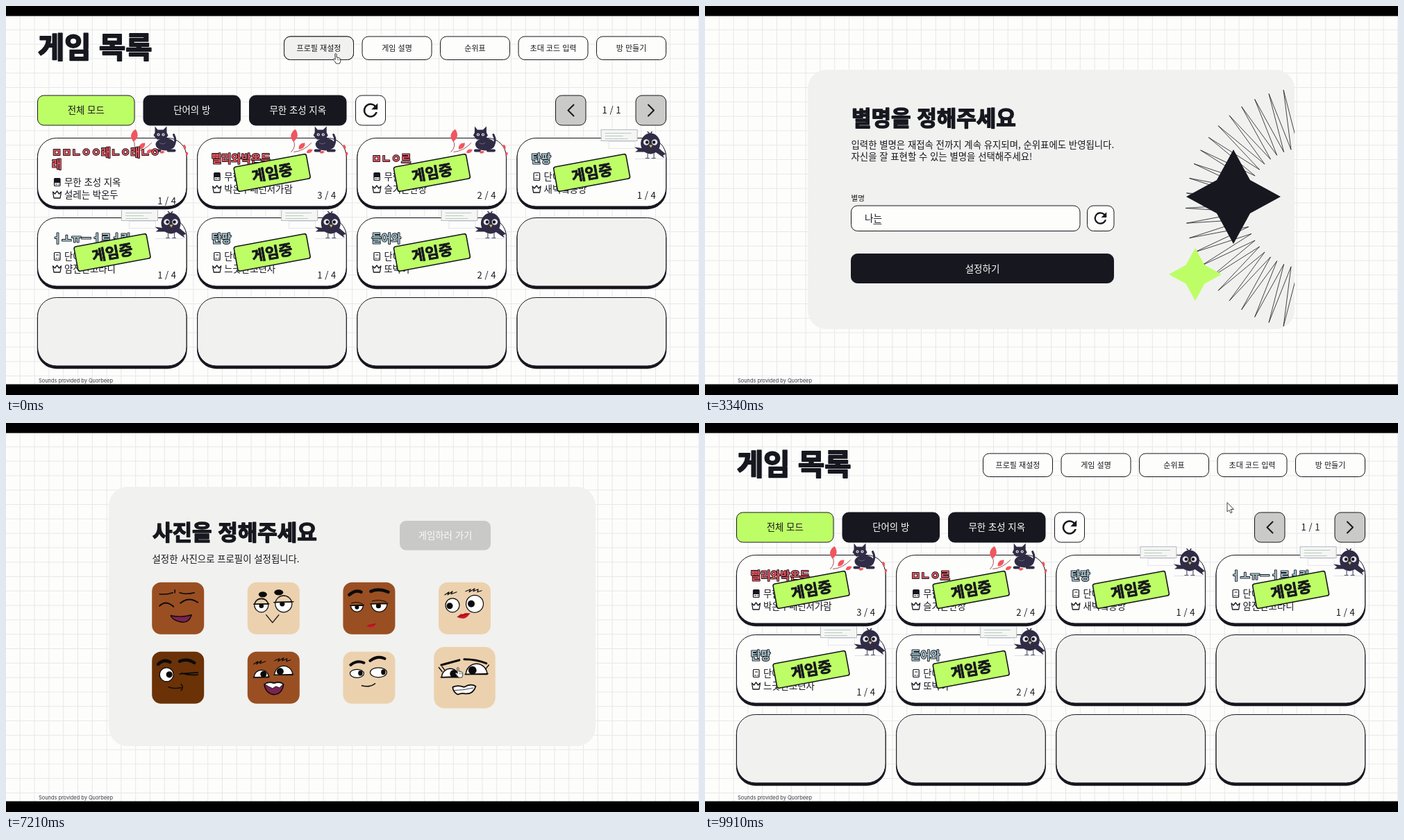
Write an HTML page that moves like this. It is 998x561 px and loops after 9970 ms.

```html
<!DOCTYPE html>
<html lang="ko">
<head>
<meta charset="utf-8">
<style>
html, body { margin: 0; width: 100%; height: 100%; overflow: hidden; background: #000; }
svg { display: block; width: 998px; height: 561px; }
text { font-family: "Noto Sans CJK KR", "Noto Sans CJK", "Noto Sans CJK JP", sans-serif; white-space: pre; }
.fun { font-weight: 900; stroke-linejoin: round; paint-order: stroke; }
.latin { font-family: Inter, sans-serif; }
</style>
</head>
<body>
<svg id="stage" viewBox="0 0 998 561" xmlns="http://www.w3.org/2000/svg"></svg>
<script>
const LOOP = 9970, INK = '#17171f', GREEN = '#bdfe66', PAPER = '#fdfdfc', MIST = '#f1f1ef';
const BROWN = '#9a4f22', SKIN = '#ecd1ae', DARK = '#6a3206';

// ---------- drawing helpers ----------
const at = (x, y, body, more = '') => `<g transform="translate(${x} ${y})${more}">${body}</g>`;
const rect = (x, y, w, h, r, fill, stroke = 'none', sw = 1, more = '') =>
  `<rect x="${x}" y="${y}" width="${w}" height="${h}" rx="${r}" fill="${fill}" stroke="${stroke}" stroke-width="${sw}" ${more}/>`;
const path = (d, fill = 'none', stroke = 'none', sw = 1) =>
  `<path d="${d}" fill="${fill}" stroke="${stroke}" stroke-width="${sw}" stroke-linecap="round" stroke-linejoin="round"/>`;
const oval = (x, y, rx, ry = rx, fill = '#fff', stroke = 'none', sw = 1.2) =>
  `<ellipse cx="${x}" cy="${y}" rx="${rx}" ry="${ry}" fill="${fill}" stroke="${stroke}" stroke-width="${sw}"/>`;
const text = (x, cy, size, s, fill = INK, more = '') =>
  `<text x="${x}" y="${(cy + size * .37).toFixed(2)}" font-size="${size}" fill="${fill}" ${more}>${s}</text>`;
const MID = 'text-anchor="middle"';
const title = (x, cy, size, s) =>
  text(x, cy, size, s, INK, `class="fun" stroke="${INK}" stroke-width="${size * .045}"`);
const button = (x, y, w, h, fill, s, size, color = INK) =>
  rect(x, y, w, h, 9, fill, INK) + text(x + w / 2, y + h / 2, size, s, color, MID);
const reload = (x, y, k) =>
  at(x, y, path('M5.65 -5.65A8 8 0 1 0 7.73 2H5.65A6 6 0 1 1 0 -6C1.66 -6 3.14 -5.31 4.22 -4.22L1 -1H8V-8Z', INK), ` scale(${k})`);

const defs = `<defs>
  <pattern id="grid" x="0" y="14" width="20.8" height="20.8" patternUnits="userSpaceOnUse">
    <rect width="21" height="21" fill="#fdfdfc"/><path d="M20.3 0V21M0 20.3H21" stroke="#e8e8ea"/></pattern>
  <clipPath id="clip"><rect x="148" y="92" width="701" height="374" rx="27"/></clipPath>
</defs>`;

// ---------- room list ----------
const NIGHT = '#302c46', RED = '#f0565e';
const leaf = (x, y, a, k = 1) => at(x, y, path('M0 0C-7 -5 -6 -13 0 -18C6 -12 6 -5 0 0Z', RED), ` rotate(${a}) scale(${k})`);
const cat = path('M135 20Q143 12 138 3M139 20Q153 19 164 7', 'none', '#a0525e') +
  leaf(138, 5, 10) + leaf(146, 16, 45, .7) + leaf(157, 21, 65, .55) + leaf(176, 21, 80, .4) + leaf(213, 16, -20, .4) + leaf(214, 26, 20, .35) +
  path('M195 12Q201 4 196 -5', 'none', NIGHT, 3) +
  path('M169 -17L173 -12H181L186 -17V-8L188 -4L184 2H172L167 -4L169 -8Z', NIGHT) + oval(184, 9, 14, 9, NIGHT) +
  oval(174, -5, 2) + oval(181, -5, 2) + oval(174, -5, .9, .9, '#111') + oval(181, -5, .9, .9, '#111') +
  path('M170 18H176M188 18H197', 'none', NIGHT, 4) + path('M176 7Q180 10 184 7', 'none', '#77738c', .8);
const bird = rect(121, -12, 52, 16, 0, '#f5f6f3', '#b5b8c4') + path('M127 -7H164M127 -3H152M127 1H159', 'none', '#a9c0b8', .8) +
  rect(132, 5, 38, 10, 0, 'none', '#e4e4ee') + path('M170 30H211', 'none', '#d9d9e4', .8) +
  path('M183 15L169 13L174 17L170 20L185 20M201 12L214 23L210 25L212 29L199 20', NIGHT) +
  path('M191 -6L188 -9M192 -6L194 -9', 'none', NIGHT, 1.5) + oval(192, 8, 14, 15, NIGHT) +
  path('M188 22V29M197 22V29M185 29H190M194 29H199', 'none', '#56546a', 1.2) +
  oval(186, 6, 4.2, 4.2, '#e9e9f0') + oval(198, 6, 4.2, 4.2, '#e9e9f0') + oval(187, 6, 2.2, 2.2, '#111') + oval(197, 6, 2.2, 2.2, '#111') +
  path('M190 10H195L192.5 14Z', '#d9b96a');
const badge = at(107.5, 50, rect(-53, -18, 106, 36, 3, GREEN, INK, 1.6) +
  text(0, 0, 21.5, '게임중', INK, `${MID} class="fun" stroke="${INK}" stroke-width=".8"`), ' rotate(-10.5)');
const crown = path('M-6 -4L-3 -1L0 -5L3 -1L6 -4L4.5 5H-4.5Z', 'none', INK, 1.3);
const door = hard => rect(-4, -5.5, 8.5, 11, 1, 'none', INK, 1.2) +
  (hard ? rect(-4, -5, 8.5, 6, 0, INK) : path('M-1 -2H2', 'none', INK, 1.2)) + path('M-2 3H0M2 3H3', 'none', INK, 1.2);

const rooms = [
  { hard: 1, name: ['ㅁㅁㄴㅇㅇ래ㄴㅇ래ㄴㅇ', '래'], host: '설레는 박온두', n: 1, open: 1 },
  { hard: 1, name: ['빨리와박온두'], host: '박온두패턴서가람', n: 3 },
  { hard: 1, name: ['ㅁㄴㅇ르'], host: '슬기론단장', n: 2 },
  { name: ['탄팡'], host: '새벽녘공방', n: 1 },
  { name: ['ㅓㅗㅠㅡㅓ르ㅓ림'], host: '얌전한고라니', n: 1 },
  { name: ['탄팡'], host: '느긋한조련사', n: 1 },
  { name: ['들어와'], host: '또박이', n: 2 }
];

function card(room, i) {
  const x = 45.5 + (i % 4) * 230.2, y = 190.5 + Math.floor(i / 4) * 115;
  const base = rect(x, y + 2, 214.5, 100, 27, INK, INK, 1.4) + rect(x, y, 214.5, 98.5, 27, room ? PAPER : MIST, INK);
  if (!room) return base;
  const two = room.name.length > 1, dy = two ? 8 : 0;
  const names = room.name.map((s, k) => text(20.5, (two ? 21 : 30) + k * 17, 15.4, s, room.hard ? RED : '#a9c9d1',
    `class="fun" stroke="${INK}" stroke-width="1.8"`)).join('');
  return base + at(x, y, (room.hard ? cat : bird) + names +
    at(28, 55.5 + dy, door(room.hard)) + text(38.5, 55.5 + dy, 13.4, room.hard ? '무한 초성 지옥' : '단어의 방') +
    at(28, 73.5 + dy, crown) + text(38.5, 73.5 + dy, 13.4, room.host) +
    text(199.5, 82.5 + dy, 13, room.n + ' / 4', INK, 'text-anchor="end"') + (room.open ? '' : badge));
}
const cards = set => Array.from({ length: 12 }, (_, i) => card(set[i], i)).join('');
const chevron = (x, k) => rect(x, 129, 43.5, 43, 9, '#cacac8', INK) +
  path(`M${x + 22 + 4 * k} 142.5L${x + 22 - 4 * k} 150.5L${x + 22 + 4 * k} 158.5`, 'none', INK, 2);

const listView = title(46, 60, 41.5, '게임 목록') +
  ['프로필 재설정', '게임 설명', '순위표', '초대 코드 입력', '방 만들기']
    .map((s, i) => button(400.5 + i * 112.5, 44, 100, 33.5, PAPER, s, 11)).join('') +
  `<g id="hover">${button(400.5, 44, 100, 33.5, MIST, '프로필 재설정', 11)}</g>` +
  button(45.5, 129, 139.5, 43, GREEN, '전체 모드', 13.4) +
  button(198, 129, 139.5, 43, INK, '단어의 방', 13.4, '#fff') +
  button(350.5, 129, 139.5, 43, INK, '무한 초성 지옥', 13.4, '#fff') +
  rect(503.5, 129, 43, 43, 9, PAPER, INK) + reload(525, 150.5, 1.28) +
  chevron(791.5, 1) + text(872, 150.5, 13, '1 / 1', INK, MID) + chevron(907, -1) +
  `<g id="before">${cards(rooms)}</g><g id="after">${cards(rooms.slice(1))}</g>`;

// ---------- nickname view ----------
function burst(cx, cy, r, R, spikes) {
  const pts = [];
  for (let i = 0; i <= spikes; i++) {
    const a = i * Math.PI / spikes, d = i % 2 ? R : r;
    pts.push(`${(cx - d * Math.sin(a)).toFixed(1)} ${(cy - d * Math.cos(a)).toFixed(1)}`);
  }
  return path('M' + pts.join('L'), 'none', INK, .8);
}
function star(cx, cy, R, r, fill) {
  const pts = Array.from({ length: 8 }, (_, i) => {
    const a = i * Math.PI / 4, d = i % 2 ? r : R;
    return `${cx + d * Math.sin(a)} ${cy - d * Math.cos(a)}`;
  });
  return path(`M${pts.join('L')}Z`, fill);
}
const nickView = burst(865.6, 291.5, 87, 173.5, 50) + star(761, 275, 68, 34, INK) + star(706, 387, 38, 19, GREEN) +
  title(211, 162, 31, '별명을 정해주세요') +
  text(210.5, 200.5, 13.4, '입력한 별명은 재접속 전까지 계속 유지되며, 순위표에도 반영됩니다.') +
  text(210.5, 217.5, 13.4, '자신을 잘 표현할 수 있는 별명을 선택해주세요!') +
  text(210.5, 277, 10.5, '별명') +
  rect(210.5, 288, 329.5, 36.5, 9, PAPER, INK) + rect(550.5, 288, 38.5, 36.5, 9, PAPER, INK) + reload(569.5, 306, 1.1) +
  rect(229.5, 297, 50.5, 18, 0, '#2f62cc', 'none', 1, 'id="mark"') +
  text(230, 306, 13.5, '', INK, 'id="typed"') +
  rect(230, 314, 12, .8, 0, INK, 'none', 1, 'id="under"') +
  button(210.5, 357.5, 378, 42, INK, '설정하기', 13.5, '#fff');

// ---------- picture view ----------
const K = '#0b0b0b';
const line = (d, w = 1.6) => path(d, 'none', K, w);
const brush = line('M9 18L15 14L13 18L20 13L18 17L26 14M39 13L46 10L44 14L52 9L50 13L57 10L56 14L62 12', 1.2);
const ball = (x, y, r, px, py, pr) => oval(x, y, r, r, '#fff', K) + oval(px, py, pr, pr, K);
// Half eye: flat edge on top (up = 0) or at the bottom (up = 1).
const half = (x, y, r, px, pr, up) => path(`M${x - r} ${y}A${r} ${r} 0 0 ${up} ${x + r} ${y}Z`, '#fff', K, 1.3) +
  oval(px, y + pr * (up ? -1 : .8), pr, pr, K) + line(`M${x - r - 1} ${y}L${x + r + 1} ${y - 1}`, 1.3);
const lips = (x, y, k) => at(x, y, path('M-9 2Q-4 -4 -1 -2Q2 -5 9 -3Q4 5 -2 4Q-6 4 -9 2Z', '#cf1726') + path('M-9 2Q0 -1 9 -3', 'none', '#70101a', .8), ` scale(${k})`);
const faces = [
  [BROWN, line('M11 17Q22 18 30 15M40 15Q50 18 61 15M33 11V15') + line('M11 34Q20 25 31 35M41 30Q53 20 66 29', 2) +
    path('M27 48Q42 51 57 47Q53 60 41 57Q30 55 27 48Z', '#7b2350', K, 1.4)],
  [SKIN, oval(22, 17.5, 6, 4, K) + oval(45, 14.5, 6.5, 4, K) +
    ball(20, 33, 10, 20, 34, 3.3) + ball(52, 31, 12, 50, 31, 3.6) +
    path('M10.5 31A10 10 0 0 1 29.5 31Z', SKIN, K) + path('M40.5 28A12 12 0 0 1 63.5 28Z', SKIN, K) +
    line('M9 31.5L31 31M38 29L66 28') + line('M27 47L36 58L45 47', 1.3)],
  [BROWN, line('M9 18Q18 10 26 14M40 13Q52 8 65 14', 4.5) + half(20, 33.5, 9, 20, 3, 0) + half(52, 31, 11.5, 51, 3.6, 0) +
    line('M12 30Q20 27 28 31M42 27Q52 24 62 28', 1) + lips(41, 62, .7)],
  [SKIN, brush + ball(20, 33, 10, 16, 34, 4.5) + ball(52, 31, 12.5, 47, 31, 5) + lips(36, 48, 1)],
  [DARK, line('M9 18Q17 10 26 15M40 14Q50 9 61 16', 4.5) + ball(21, 33, 10, 25, 33, 4.6) +
    line('M40 32L66 30M43 31Q54 35 66 33', 1.8) + line('M24 51Q32 54 42 52M42 47Q46 51 42 56', 1.4)],
  [BROWN, brush + half(20, 37, 10.5, 23, 4.5, 1) + half(52, 33.5, 13, 47, 5, 1) +
    path('M24 47Q31 42 38 45Q47 42 52 47Q50 61 38 62Q26 60 24 47Z', '#7b2350', K, 1.4) +
    path('M25 47Q31 43 38 46Q46 43 51 47L46 52L41 50L36 53L30 50Z', '#fff', K, .8)],
  [SKIN, line('M11 19Q20 12 30 16M39 13Q50 5 60 10', 4) + oval(20, 31.5, 10, 6, '#fff', K) + oval(51, 30, 12, 7, '#fff', K) +
    oval(25, 31, 3.2, 3.8, K) + oval(58, 29.5, 3.2, 4, K) + line('M27 49Q38 52 46 46', 1.5)],
  [SKIN, line('M9 22Q20 19 31 16M37 15Q52 15 64 20', 2.6) + half(20, 37, 10.5, 24, 4.5, 1) + half(52, 33.5, 13, 47, 5, 1) +
    line('M10 30L6 25M13 28L10 24M63 27L67 22', 1.2) +
    path('M23 49Q29 46 37 49Q45 44 51 48Q48 58 38 57Q34 56 29 58Q23 55 23 49Z', '#fff', K, 1.5) + path('M25 53Q36 53 48 50', 'none', K, .7)]
];
const pic = ([fill, body], i) => `<g id="pic${i}">` +
  (i === 7 ? rect(-1.2, -1.2, 77.4, 77.4, 14, 'none', INK, 2.6, 'id="ring"') : '') + rect(0, 0, 75, 75, 13, fill) + body + '</g>';
const pictureView = title(211, 158, 31, '사진을 정해주세요') +
  text(210.5, 196, 13.4, '설정한 사진으로 프로필이 설정됩니다.') +
  rect(567, 141, 131, 42.5, 9, '#c9c9c8', 'none', 1, 'id="go"') + text(632.5, 162, 13.4, '게임하러 가기', '#fafafa', MID) +
  faces.map(pic).join('');

// ---------- stage ----------
const arrow = path('M0 0V13L3 10.5L5 15L7 14L5 9.5H9Z', '#fff', '#333', .9);
const hand = path('M2 1Q3.5 -.5 4 1.5V6Q8 6 9.5 8Q10.5 12 8.5 15H3.5Q2 11.5 -1 9.5Q-.5 7 2 9Z', '#fff', '#222', .9) +
  path('M5.5 8V10M7.5 8.5V10', 'none', '#222', .6);
document.getElementById('stage').innerHTML = defs + rect(0, 14, 998, 532, 0, 'url(#grid)') +
  text(47, 540, 7.4, 'Sounds provided by Quorbeep', '#3a3a44', 'class="latin"') +
  `<g id="list">${listView}</g>
  <g id="panel">${rect(148, 92, 701, 374, 27, MIST)}<g clip-path="url(#clip)"><g id="nick">${nickView}</g><g id="photo">${pictureView}</g></g></g>
  <g id="cursor"><g id="arrow">${arrow}</g><g id="hand">${hand}</g></g>` +
  rect(0, 0, 998, 14.5, 0, '#000') + rect(0, 545.5, 998, 16, 0, '#000');

const $ = Object.fromEntries([...document.querySelectorAll('svg [id]')].map(e => [e.id, e]));

// ---------- timeline ----------
const typing = [[0, '파란너울'], [2550, 'ㄴ'], [2670, '나'], [2780, '난'], [2900, '나느'], [3340, '나는'],
  [3430, '나는ㅁ'], [3520, '나는머'], [3610, '나는멋'], [3740, '나는멋ㅈ'], [4170, '나는멋재'], [4300, '나는멋쟁'],
  [4430, '나는멋쟁ㅇ'], [4560, '나는멋쟁이']];
const moves = [[0, 472, 68], [1000, 472, 68], [1330, 258, 306], [4700, 258, 306], [5010, 378, 381], [6300, 378, 381],
  [6620, 522, 372], [7000, 648, 352], [7730, 648, 352], [7980, 636, 169], [9340, 636, 169], [9880, 752, 115]];
const hovers = [[5, 5905, 6430], [6, 6500, 6760], [7, 6840, 7800]];

const ramp = (t, a, b) => { const p = Math.min(1, Math.max(0, (t - a) / (b - a))); return p * p * (3 - 2 * p); };
const within = (t, a, b) => t >= a && t < b;
const show = (el, on) => { el.style.display = on ? '' : 'none'; };
const fade = (el, o) => { el.style.opacity = o; show(el, o > 0); };
const slide = (el, x, o) => { el.setAttribute('transform', `translate(${x} 0)`); fade(el, o); };

function render(t) {
  fade($.list, t < 4000 ? 1 - ramp(t, 250, 550) : ramp(t, 9020, 9310));
  show($.before, t < 4000);
  show($.after, t >= 4000);
  show($.hover, t < 1000);
  fade($.panel, ramp(t, 550, 950) * (1 - ramp(t, 8950, 9120)));

  const out = ramp(t, 5150, 5550);
  slide($.nick, 600 * out, 1 - out);
  const come = ramp(t, 5500, 5900), leave = ramp(t, 8515, 8990);
  slide($.photo, 600 * (leave + come - 1), come * (1 - leave));

  const now = typing.filter(s => s[0] <= t).pop()[1], marked = within(t, 1330, 2550);
  $.typed.textContent = now;
  $.typed.setAttribute('fill', marked ? '#fff' : INK);
  show($.mark, marked);
  show($.under, within(t, 2550, 4700));
  $.under.setAttribute('x', 230 + 12.42 * (now.length - 1));

  faces.forEach((_, i) => {
    const h = hovers.find(v => v[0] === i);
    const k = h ? 1 + .18 * (ramp(t, h[1], h[1] + 300) - ramp(t, h[2], h[2] + 300)) : 1;
    const x = 247.7 + (i % 4) * 137.6, y = i < 4 ? 267.3 : 367.3;
    $['pic' + i].setAttribute('transform', `translate(${x} ${y}) scale(${k}) translate(-37.5 -37.5)`);
  });
  show($.ring, t >= 7500);
  $.go.setAttribute('fill', t < 7500 ? '#c9c9c8' : t < 7960 ? INK : '#45444d');

  const j = moves.findIndex(m => m[0] > t), b = moves[j < 0 ? moves.length - 1 : j], a = j < 0 ? b : moves[j - 1];
  const p = a === b ? 1 : ramp(t, a[0], b[0]);
  $.cursor.setAttribute('transform', `translate(${a[1] + (b[1] - a[1]) * p} ${a[2] + (b[2] - a[2]) * p})`);
  show($.cursor, !within(t, 1330, 4700));
  const pointing = t < 550 || within(t, 4930, 5500) || within(t, 5850, 7780) || within(t, 7940, 9000);
  show($.hand, pointing);
  show($.arrow, !pointing);
}

const start = performance.now();
function tick() {
  render((performance.now() - start) % LOOP);
  requestAnimationFrame(tick);
}
tick();
</script>
</body>
</html>
```
